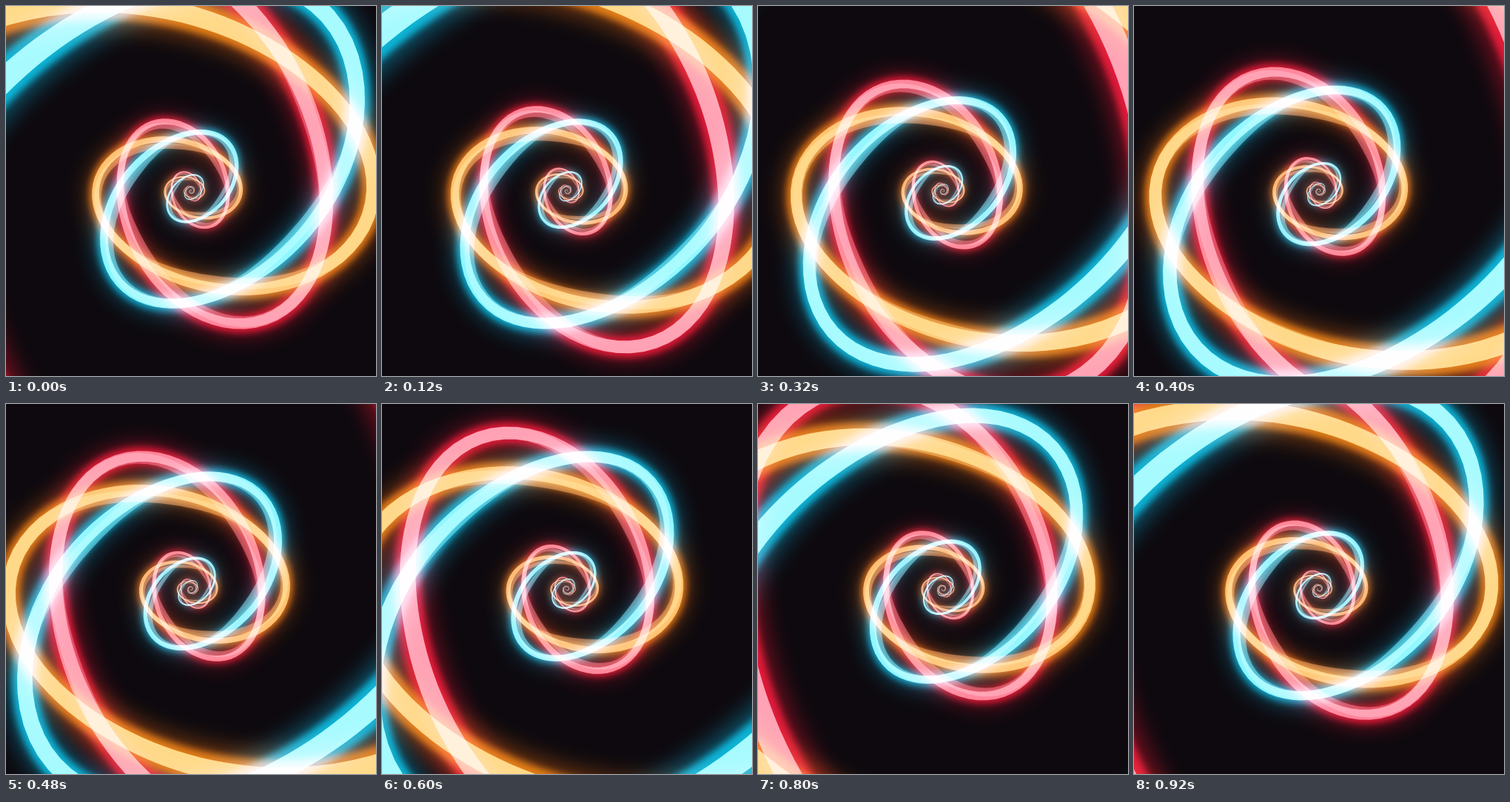
An HTML page with a canvas for the animation above (960 ms loop, 500 by 500 pixels).

```html
<!DOCTYPE html>
<html lang="en">
<head>
<meta charset="utf-8">
<title>Neon spiral zoom</title>
<style>
  html, body { margin: 0; width: 100%; height: 100%; overflow: hidden; background: #0d090e; }
  canvas { display: block; }
</style>
</head>
<body>
<canvas id="stage" width="500" height="500"></canvas>
<script>
const ctx = document.getElementById('stage').getContext('2d');
const LOOP = 960, STEP = 40;
const ZOOM = 3.65;                            // growth per loop and per spiral turn
const DECAY = Math.log(ZOOM) / (2 * Math.PI);
const LONG = 249, SHORT = 171, WIDTH = 18.5;
const RAD = Math.PI / 180;

const strands = [
  { axis: 8 * RAD, core: 'rgb(255,150,95)', glow: 'rgb(255,118,8)' },
  { axis: 61 * RAD, core: 'rgb(255,120,128)', glow: 'rgb(255,15,42)' },
  { axis: 129 * RAD, core: 'rgb(130,230,255)', glow: 'rgb(0,185,235)' }
];

// Radius of an elliptic logarithmic spiral. The echo is pulled inwards
// behind each long end and merges with the main line far from the centre.
function radius(angle, axis, scale, echo) {
  const a = angle - axis;
  const ellipse = LONG * SHORT / Math.hypot(SHORT * Math.cos(a), LONG * Math.sin(a));
  const r = scale * ellipse * Math.exp(-DECAY * angle);
  if (!echo) return r;
  const dip = 0.11 * Math.max(0, 1 - r / 220);
  return r * Math.exp(-dip * (1 + Math.cos(2 * (a - 50 * RAD))));
}

// Closed outline of a band whose width shrinks along with the spiral.
function band(axis, scale, width, echo = false) {
  const outer = [], inner = [];
  const point = angle => {
    const r = radius(angle, axis, scale, echo);
    return [r * Math.cos(angle), r * Math.sin(angle)];
  };
  for (let deg = -540; deg <= 1640; deg += 4) {
    const angle = deg * RAD;
    const [x, y] = point(angle);
    const [nx, ny] = point(angle + 0.01);
    const dx = nx - x, dy = ny - y;
    const half = scale * width / 2 * Math.exp(-DECAY * angle) / Math.hypot(dx, dy);
    outer.push([x + dy * half, y - dx * half]);
    inner.push([x - dy * half, y + dx * half]);
  }
  const path = new Path2D();
  for (const [x, y] of [...outer, ...inner.reverse()]) path.lineTo(x, y);
  path.closePath();
  return path;
}

function paint(path, color, alpha, blur) {
  ctx.filter = blur ? `blur(${blur}px)` : 'none';
  ctx.globalAlpha = alpha;
  ctx.fillStyle = color;
  ctx.fill(path);
}

function draw(time) {
  const scale = ZOOM ** (time / LOOP);
  ctx.setTransform(1, 0, 0, 1, 0, 0);
  ctx.globalCompositeOperation = 'source-over';
  ctx.filter = 'none';
  ctx.globalAlpha = 1;
  ctx.fillStyle = '#0d090e';
  ctx.fillRect(0, 0, 500, 500);

  ctx.translate(250, 250);
  ctx.globalCompositeOperation = 'screen';
  for (const { axis, core, glow } of strands) {
    paint(band(axis, scale, WIDTH * 2.6), glow, 0.36, 14);
    paint(band(axis, scale, WIDTH * 1.7), glow, 0.8, 5);
    paint(band(axis, scale, WIDTH, true), core, 0.5, 0);
    paint(band(axis, scale, WIDTH), core, 1, 0);
  }
}

let shown = -1;
function tick() {
  const time = Math.floor(performance.now() % LOOP / STEP) * STEP;
  if (time !== shown) draw(shown = time);
  requestAnimationFrame(tick);
}
tick();
</script>
</body>
</html>
```
